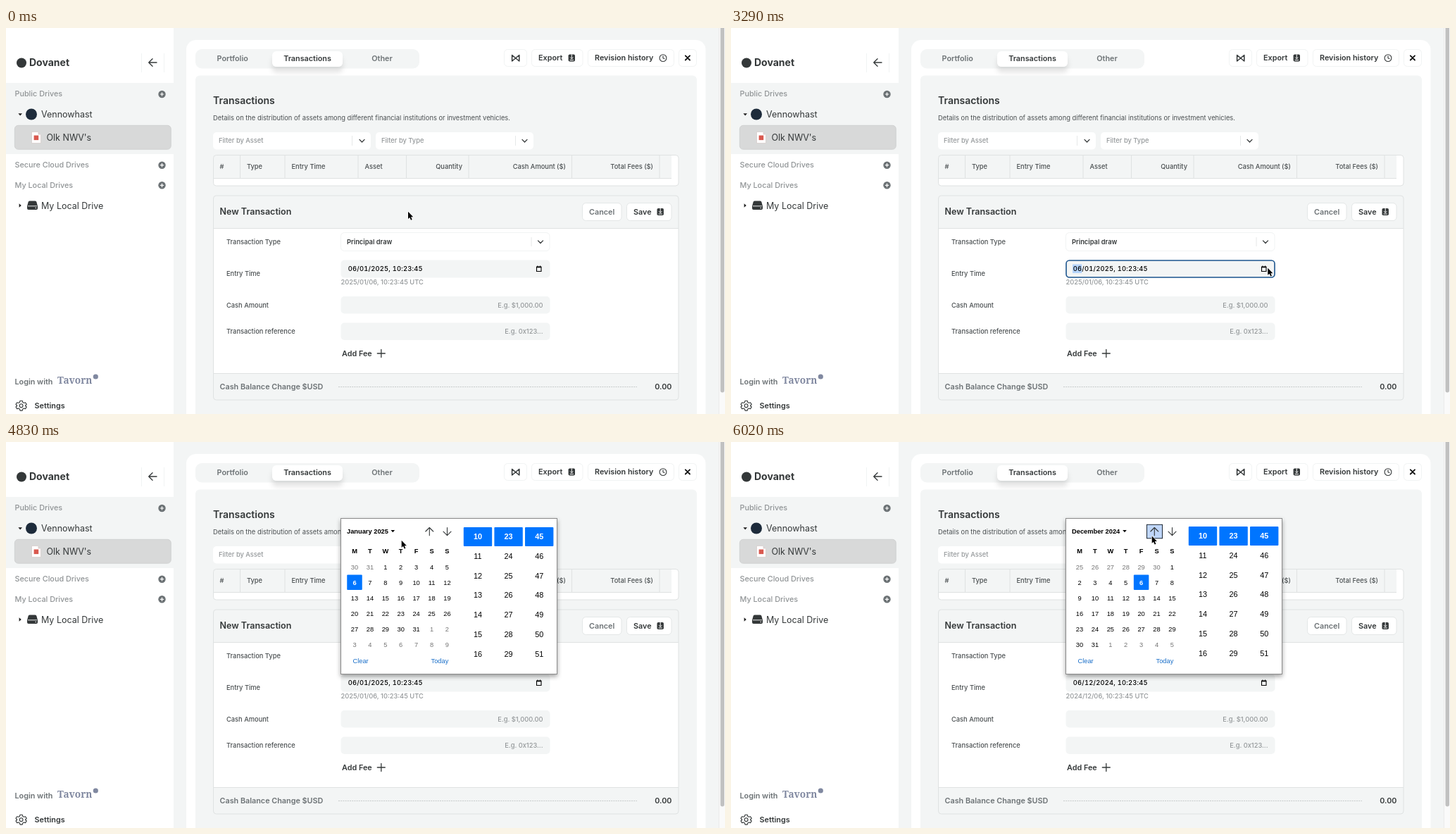
These frames come from a looping animation (1021 px wide and 548 px high, 8000 ms). An HTML page:

```html
<!DOCTYPE html>
<html lang="en">
<head>
<meta charset="utf-8">
<title>New transaction form</title>
<style>
html, body { margin: 0; width: 100%; height: 100%; overflow: hidden; background: #fff; }
svg { display: block; width: 100%; height: 100%; }
text { font-family: Inter, "Open Sans", sans-serif; fill: #343839; white-space: pre; }
.xs { font-size: 9.3px; font-weight: 500; fill: #4a4f51; }
.sm { font-size: 10.8px; font-weight: 600; }
.md { font-size: 12.5px; }
.lg { font-size: 14px; font-weight: 600; }
.muted { fill: #94989a; }
.sec { font-weight: 500; fill: #909496; }
.end { text-anchor: end; }
.mid { text-anchor: middle; }
.bg { fill: #f3f5f5; }
.white { fill: #fff; }
.edge { fill: none; stroke: #dfe2e2; }
.btn { fill: #fff; stroke: #e4e7e7; }
.faint { fill: #fff; stroke: #f1f3f3; }
.ink { fill: #343839; }
.line { fill: none; stroke: #343839; stroke-width: 1.3; stroke-linecap: round; stroke-linejoin: round; }
.thin { stroke-width: 1.1; }
.time { font-size: 9.3px; font-weight: 500; fill: #000; letter-spacing: .25px; font-variant-numeric: tabular-nums; }
#popup text { font-family: "Liberation Sans", Arial, sans-serif; font-size: 9.3px; fill: #000; }
#popup .bold { font-weight: 700; }
#popup .link { fill: #1a6fc9; }
#popup .out { fill: #757575; }
#popup .on { fill: #fff; font-weight: 700; }
#popup #cols text { font-size: 10.85px; }
.pick { fill: #0075ff; }
</style>
</head>
<body>
<svg viewBox="0 0 1021 548">
  <defs>
    <filter id="soft" x="-20%" y="-50%" width="140%" height="260%">
      <feDropShadow dx="0" dy="8" stdDeviation="3.5" flood-color="#000" flood-opacity=".11"/>
    </filter>
    <filter id="lift" x="-10%" y="-10%" width="120%" height="120%">
      <feDropShadow dx="0" dy="3" stdDeviation="3.4" flood-color="#000" flood-opacity=".36"/>
    </filter>
    <g id="plus">
      <circle r="5.2" fill="#6c7275"/>
      <path d="M-2.6 0H2.6M0-2.6V2.6" stroke="#fff" stroke-width="1.2"/>
    </g>
    <path id="chev" class="line" d="M-3.5-1.8 0 1.8 3.5-1.8"/>
    <g id="disk">
      <rect class="ink" x="-4.7" y="-5" width="9.4" height="10" rx="1.8"/>
      <path d="M0-5V1.2M-2.1-.8 0 1.4 2.1-.8M-2.6 3H2.6" fill="none" stroke="#fff"/>
    </g>
  </defs>

  <!-- page -->
  <rect class="bg" x="238" width="783" height="548"/>
  <rect class="white" x="256" y="17" width="737.5" height="560" rx="14"/>
  <rect x="1012.5" width="8.5" height="548" fill="#fafafa"/>
  <path d="M1012.5 0V548" stroke="#ebebeb"/>
  <rect x="1014.5" y="-6" width="5.5" height="523.5" rx="2.75" fill="#c1c1c1"/>

  <!-- sidebar -->
  <rect class="bg" y="78" width="238" height="101"/>
  <circle cx="22" cy="49.5" r="7" class="ink"/>
  <text class="lg" x="33" y="54.4" style="font-weight:700">Dovanet</text>
  <path d="M192.5 36V63M224.5 36V63" stroke="#f1f3f3"/>
  <path class="line" d="M214 49H203M208 43.7 202.7 49 208 54.3"/>
  <text class="sm sec" x="12.5" y="96.6">Public Drives</text>
  <text class="sm sec" x="12.5" y="197.6">Secure Cloud Drives</text>
  <text class="sm sec" x="12.5" y="226.6">My Local Drives</text>
  <use href="#plus" x="221.5" y="94"/>
  <use href="#plus" x="221.5" y="194.7"/>
  <use href="#plus" x="221.5" y="223.3"/>
  <path d="M17.4 121.3H23L20.2 124.4Z M18.6 249.3V254.7L21.8 252Z" fill="#222"/>
  <circle cx="36" cy="122.5" r="8" fill="#1d2b3b"/>
  <text class="md" x="50" y="127">Vennowhast</text>
  <rect x="12.3" y="138.3" width="222" height="34" rx="5" fill="#d8d9d9" stroke="#cacccc" stroke-width=".7"/>
  <path d="M36.5 147.5H45.5L49.5 151.5V163.5H36.5Z" fill="#fff" stroke="#d5c9c8" stroke-width=".7"/>
  <path d="M45.5 147.5V151.5H49.5Z" fill="#dcd2d1"/>
  <rect x="39.6" y="152.5" width="6.6" height="6.6" fill="#d9594f"/>
  <text class="md" x="57.5" y="160">Olk NWV's</text>
  <path d="M33.5 245.5H41.5Q43 245.5 43.4 247L45 253V256Q45 258 43 258H32Q30 258 30 256V253L31.6 247Q32 245.5 33.5 245.5Z" class="ink"/>
  <path d="M31 252.8H44" stroke="#fff" stroke-width=".9"/>
  <circle cx="42.3" cy="255.5" r=".8" fill="#fff"/>
  <text class="md" x="50" y="256.5">My Local Drive</text>
  <text class="sm" x="12.5" y="505.6" style="fill:#6c7275">Login with</text>
  <text x="73" y="505.4" style="font:700 13.6px 'Noto Serif',serif;fill:#8088a0">Tavorn</text>
  <circle cx="127.3" cy="495" r="3.6" fill="#8088a0"/>
  <path class="line thin" d="M20 529.2H23.2L23.8 531.4 25.4 532.3 27.6 531.7 29.2 534.4 27.6 536 27.6 536.5 29.2 538 27.6 540.6 25.4 540 23.8 540.9 23.2 543.1H20L19.4 540.9 17.8 540 15.6 540.6 14 538 15.6 536.5V536L14 534.4 15.6 531.7 17.8 532.3 19.4 531.4Z"/>
  <circle class="line thin" cx="21.6" cy="536.2" r="2.4"/>
  <text class="sm" x="40.5" y="540">Settings</text>

  <!-- top bar -->
  <rect class="bg" x="269" y="30" width="318" height="27.5" rx="9"/>
  <rect class="white" x="378" y="33" width="100" height="22" rx="6" filter="url(#soft)"/>
  <g class="mid">
    <text class="sm" x="321.7" y="47.4" style="fill:#6c7275">Portfolio</text>
    <text class="sm" x="428" y="47.4">Transactions</text>
    <text class="sm" x="534" y="47.4" style="fill:#6c7275">Other</text>
  </g>
  <rect class="faint" x="707.5" y="30.5" width="32" height="24" rx="5"/>
  <rect class="faint" x="746.5" y="30.5" width="72.5" height="24" rx="5"/>
  <rect class="faint" x="826.5" y="30.5" width="122" height="24" rx="5"/>
  <rect class="faint" x="955.5" y="30.5" width="25" height="24" rx="5"/>
  <path class="line" style="stroke-width:1.5" d="M718.6 38.5V47L728.8 38.5V47Z"/>
  <text class="sm" x="756" y="46.4">Export</text>
  <use href="#disk" x="803.3" y="42.5"/>
  <text class="sm" x="836" y="46.4">Revision history</text>
  <circle class="line thin" cx="933" cy="42.6" r="4.9"/>
  <path class="line thin" d="M933 39.8V42.8L935 43.8"/>
  <path class="line" d="M964.8 39.3 971 45.5M971 39.3 964.8 45.5" style="stroke-width:1.8;stroke:#111"/>

  <!-- content -->
  <rect class="bg" x="269" y="67.5" width="712" height="490" rx="6"/>
  <text class="lg" x="294" y="108">Transactions</text>
  <text class="xs" x="294" y="130.5" style="font-size:9.34px;font-weight:400">Details on the distribution of assets among different financial institutions or investment vehicles.</text>
  <rect class="white" x="294" y="148" width="224" height="24.5" rx="5"/>
  <rect class="white" x="525" y="148" width="224" height="24.5" rx="5"/>
  <path d="M491.5 153V167M723.5 153V167" stroke="#e6e8e8"/>
  <text class="xs muted" x="302" y="163.4">Filter by Asset</text>
  <text class="xs muted" x="533" y="163.4">Filter by Type</text>
  <use href="#chev" x="505.5" y="160.2"/>
  <use href="#chev" x="736.5" y="160.2"/>

  <rect class="white" x="294.5" y="180.5" width="660.5" height="43.5" rx="4"/>
  <path class="bg" d="M294.5 184.5Q294.5 180.5 298.5 180.5H945V213.5H294.5Z"/>
  <rect class="edge" x="294.5" y="180.5" width="660.5" height="43.5" rx="4"/>
  <path class="edge" d="M294.5 213.5H945M332.5 181V213M396 181V213M500 181V213M568.5 181V213M657 181V213M803.5 181V213M928 181V213"/>
  <text class="xs" x="303.5" y="200">#</text>
  <text class="xs" x="342" y="200">Type</text>
  <text class="xs" x="405.5" y="200">Entry Time</text>
  <text class="xs" x="509.5" y="200">Asset</text>
  <text class="xs end" x="648" y="200">Quantity</text>
  <text class="xs end" x="795" y="200">Cash Amount ($)</text>
  <text class="xs end" x="919" y="200">Total Fees ($)</text>

  <!-- form -->
  <rect class="bg" x="294.5" y="238" width="660.5" height="290" rx="4"/>
  <rect class="white" x="294.5" y="284.5" width="660.5" height="206"/>
  <path class="edge" d="M294.5 284.5H955M294.5 490.5H955"/>
  <rect class="edge" x="294.5" y="238" width="660.5" height="290" rx="4"/>
  <text class="md" x="303.5" y="265.4" style="font-weight:600">New Transaction</text>
  <rect class="btn" x="818.5" y="248.5" width="55.5" height="25" rx="5"/>
  <rect class="btn" x="881.5" y="248.5" width="63.5" height="25" rx="5"/>
  <text class="sm" x="828" y="264.9" style="fill:#6c7275">Cancel</text>
  <text class="sm" x="891" y="264.9">Save</text>
  <use href="#disk" x="929.2" y="261"/>
  <text class="xs" x="313" y="307">Transaction Type</text>
  <text class="xs" x="313" y="352.3">Entry Time</text>
  <text class="xs" x="313" y="396.5">Cash Amount</text>
  <text class="xs" x="313" y="434.3">Transaction reference</text>
  <rect class="faint" x="475.5" y="290.5" width="296.5" height="26" rx="5"/>
  <path d="M746 297V310" stroke="#e6e8e8"/>
  <use href="#chev" x="759" y="303.7"/>
  <text class="xs" x="484" y="306.9" style="font-weight:600;fill:#343839">Principal draw</text>
  <rect class="bg" x="475.5" y="329.5" width="297" height="25" rx="5"/>
  <g id="focus">
    <rect x="476" y="330" width="296" height="24" rx="4.5" fill="none" stroke="#1d568f" stroke-width="1.6"/>
    <rect x="485" y="335.5" width="13.2" height="12.5" fill="#b5d4fb"/>
  </g>
  <text class="time" id="field" x="485.7" y="345.2"></text>
  <path d="M753.5 339H760V345.5H753.5Z M753.5 339.7H760M755 337.4V339M758.5 337.4V339" fill="none" stroke="#000" stroke-width="1.1"/>
  <text class="xs muted" id="utc" x="475.5" y="364.3"></text>
  <rect class="bg" x="475.5" y="381" width="297" height="24.5" rx="5"/>
  <rect class="bg" x="475.5" y="418.5" width="297" height="24.5" rx="5"/>
  <text class="xs muted end" x="762.5" y="396.5">E.g. $1,000.00</text>
  <text class="xs muted end" x="762.5" y="434.3">E.g. 0x123...</text>
  <text class="sm" x="477" y="465.9">Add Fee</text>
  <path class="line" d="M527.3 462H538.3M532.8 456.5V467.5"/>
  <text class="sm" x="303.5" y="513.3" style="fill:#6c7275">Cash Balance Change $USD</text>
  <path d="M472 509.5H896" stroke="#c6caca" stroke-dasharray="2 1.2"/>
  <text class="sm end" x="945.5" y="513.3">0.00</text>

  <!-- date picker -->
  <g id="popup">
    <rect x="475.5" y="108.5" width="307" height="221" fill="#fff" stroke="#8a8a8a" filter="url(#lift)"/>
    <text class="bold" id="title" x="484" y="129.7"></text>
    <path id="caret" d="M-2.8-1.5H2.8L0 1.8Z"/>
    <rect id="nav" x="590.5" y="117.3" width="22" height="19.5" fill="#bfd6fa"/>
    <path class="line thin" d="M601.3 132.7V121.5M595.8 127 601.3 121.5 606.8 127M626.5 121.5V132.7M621 127.2 626.5 132.7 632 127.2"/>
    <g id="days" class="mid"></g>
    <text class="link" x="492.5" y="314.2">Clear</text>
    <text class="link" x="603.5" y="314.2">Today</text>
    <g id="cols" class="mid"></g>
  </g>

  <circle id="ring" r="15" fill="none" stroke="#000" stroke-width="1.3"/>
  <path id="mouse" d="M0 0V10.2L2.3 8.1 4 11.9 5.7 11.2 4.1 7.5H7.2Z" stroke="#fff" stroke-width="1.3" paint-order="stroke" stroke-linejoin="round"/>
</svg>
<script>
const LOOP = 8000, STEP = 70;
const CLICKS = [[3640, 757, 341], [5600, 595, 132]];
const OPEN = 3710, SETTLE = 4900, HOVER = 5180, SWITCH = 5740;

// time, x, y of the pointer tip
const PATH = [
  [210, 571, 260.8], [560, 571.4, 262], [770, 572.2, 267], [910, 574.2, 279],
  [980, 576.7, 293.7], [1050, 583, 320], [1120, 591, 331], [1190, 597.5, 336],
  [1330, 604.5, 340], [1540, 608.3, 341.6], [1890, 609.6, 342],
  [2240, 609.6, 342], [2380, 613, 342], [2520, 635, 341.6], [2660, 685, 341],
  [2800, 733, 340.5], [2940, 759, 340.3], [3010, 763, 340.3], [3150, 764.5, 340.3],
  [3220, 764.5, 340.3], [3360, 760, 341], [3500, 756.7, 341.8],
  [4060, 756.7, 341.8], [4200, 752, 337], [4340, 725, 310], [4480, 664, 246],
  [4620, 585, 176], [4690, 563, 156], [4760, 556, 145], [4830, 561.7, 139.7],
  [4900, 567, 136.5], [5040, 580, 134], [5180, 590, 133.2], [5460, 595.3, 133],
  [5600, 595.5, 133], [6020, 597.7, 133.6]
];

const MONTHS = [
  { title: "January 2025", caret: 549.3, lead: 2, before: 31, on: 7, field: "06/01/2025", utc: "2025/01/06" },
  { title: "December 2024", caret: 559, lead: 6, before: 30, on: 11, field: "06/12/2024", utc: "2024/12/06" }
];

const el = id => document.getElementById(id);
const label = (x, y, s, cls = "") => `<text class="${cls}" x="${x}" y="${y}">${s}</text>`;
const block = (x, y, w, h) => `<rect class="pick" x="${x - w / 2}" y="${y - h / 2}" width="${w}" height="${h}" rx="1"/>`;
const show = (id, on) => { el(id).style.display = on ? "" : "none"; };

function dayGrid({ lead, before, on }) {
  const colX = c => 495 + c * 21.9;
  let out = [..."MTWTFSS"].map((d, c) => label(colX(c), 158.3, d, "bold")).join("");
  for (let i = 0; i < 42; i++) {
    const x = colX(i % 7), y = 177.7 + Math.floor(i / 7) * 21.9;
    let day = i - lead + 1, cls = "";
    if (day < 1) { day += before; cls = "out"; }
    else if (day > 31) { day -= 31; cls = "out"; }
    if (i === on) { cls = "on"; out += block(x, y - .3, 21.5, 21.5); }
    out += label(x, y + 3.3, day, cls);
  }
  return out;
}

function timeColumns() {
  return [10, 23, 45].map((first, c) => {
    const x = 670 + c * 43.6;
    let out = block(x, 134.4, 40.4, 27);
    for (let r = 0; r < 7; r++) out += label(x, 138 + r * 27.8, first + r, r ? "" : "on");
    return out;
  }).join("");
}

function pointer(t) {
  const n = PATH.findIndex(p => p[0] > t);
  if (n === 0) return PATH[0].slice(1);
  if (n < 0) return PATH[PATH.length - 1].slice(1);
  const [t0, x0, y0] = PATH[n - 1], [t1, x1, y1] = PATH[n];
  const k = (t - t0) / (t1 - t0);
  return [x0 + (x1 - x0) * k, y0 + (y1 - y0) * k];
}

let current;
function setMonth(m) {
  if (m === current) return;
  current = m;
  el("title").textContent = m.title;
  el("caret").setAttribute("transform", `translate(${m.caret} 126.5)`);
  el("days").innerHTML = dayGrid(m);
  el("field").textContent = m.field + ", 10:23:45";
  el("utc").textContent = m.utc + ", 10:23:45 UTC";
}

function render(t) {
  const [x, y] = pointer(t);
  el("mouse").setAttribute("transform", `translate(${x} ${y})`);
  setMonth(MONTHS[t >= SWITCH ? 1 : 0]);
  show("focus", t >= 2240 && t < OPEN);
  show("popup", t >= OPEN);
  show("nav", t >= HOVER);
  el("nav").setAttribute("stroke", t >= CLICKS[1][0] ? "#1c2733" : "none");
  el("cols").setAttribute("transform", `translate(0 ${t >= SETTLE ? -1 : 0})`);
  const click = CLICKS.find(c => t >= c[0] && t < c[0] + 210);
  show("ring", click);
  if (click) {
    el("ring").setAttribute("transform", `translate(${click[1]} ${click[2]})`);
    el("ring").setAttribute("opacity", 1 - (t - click[0]) / 210);
  }
}

el("cols").innerHTML = timeColumns();
const start = performance.now();
function tick() {
  const t = (performance.now() - start) % LOOP;
  render(Math.floor(t / STEP) * STEP);
  requestAnimationFrame(tick);
}
tick();
</script>
</body>
</html>
```
